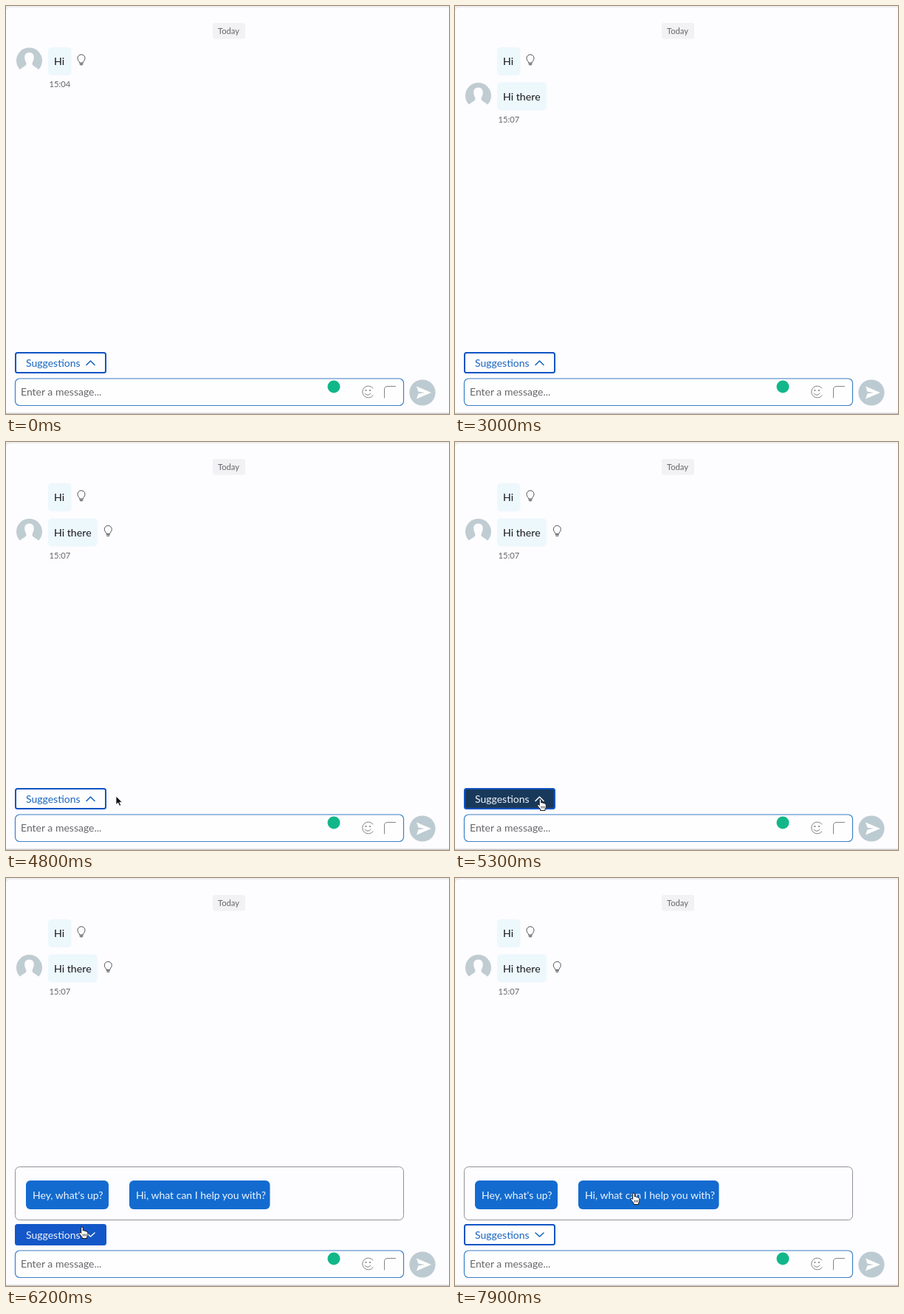
An HTML page that plays this animation: 600x553 px, repeating every 8000 ms.

```html
<!DOCTYPE html>
<html lang="en">
<head>
<meta charset="utf-8">
<title>Chat suggestions</title>
<style>
  html, body { margin: 0; width: 100%; height: 100%; overflow: hidden; background: #fdfcfe; }
  svg { display: block; width: 600px; height: 553px; font: 14px Lato, sans-serif; }
  .small { font-size: 11.2px; fill: #66666b; }
  .bubble { fill: #edf8fd; }
  .msg { font-size: 14.2px; fill: #17171b; }
  .line { fill: none; stroke-linecap: round; stroke-linejoin: round; }
  .reply rect { fill: #136bcf; }
  .reply text { fill: #eef5fc; }
</style>
</head>
<body>
<svg viewBox="0 0 600 553">
  <defs>
    <g id="bulb" class="line" stroke="#55555b" stroke-width="1">
      <path d="M-2.3 4.6C-2.5 2.8-5 2-5-1.2A5 5 0 0 1 5-1.2C5 2 2.5 2.8 2.3 4.6Z"/>
      <path d="M-2.2 6.3H2.2M-1.4 7.8H1.4"/>
    </g>
  </defs>

  <rect width="600" height="553" fill="#ededef"/>
  <path d="M0 553V8Q0 2 7 2H600V553Z" fill="#fdfcfe"/>
  <rect y="551.5" width="600" height="1.5" fill="#c9c9cd"/>

  <rect x="280" y="23" width="44" height="21.5" rx="3" fill="#f2f2f4"/>
  <text class="small" x="301.5" y="38" text-anchor="middle">Today</text>

  <rect class="bubble" x="57" y="56" width="31.5" height="38" rx="5"/>
  <text class="msg" x="65" y="80">Hi</text>
  <use href="#bulb" x="102" y="72"/>

  <g id="second">
    <rect class="bubble" x="57" y="103.5" width="67" height="38" rx="5"/>
    <text class="msg" x="65" y="128">Hi there</text>
  </g>
  <use id="newBulb" href="#bulb" x="138.3" y="119.5"/>

  <g id="sender">
    <circle cx="31.5" cy="74" r="17.5" fill="#bfccd2"/>
    <path d="M31.5 63C27 63 25 66 25.2 70C25.3 74 27 75.5 27.5 78C28 82 20 83 18.5 87V93H44.500V87C43 83 35 82 35.500 78C36 75.500 37.700 74 37.800 70C38 66 36 63 31.500 63Z" fill="#fdfcfe"/>
    <text class="small" id="clock" x="58.5" y="110">15:04</text>
  </g>

  <g id="panel">
    <rect x="12.5" y="391.500" width="526" height="72" rx="6" fill="#fdfcfe" stroke="#92929a"/>
    <g class="reply">
      <rect x="27" y="410" width="112" height="39" rx="6"/>
      <text x="36" y="435">Hey, what's up?</text>
      <rect x="167" y="410" width="190.500" height="39" rx="6"/>
      <text x="176" y="435">Hi, what can I help you with?</text>
    </g>
  </g>

  <rect id="button" x="13" y="470" width="122" height="27" rx="2.500" stroke="#1054c4" stroke-width="2"/>
  <text id="label" x="27" y="488.500">Suggestions</text>
  <path id="chevron" class="line" stroke-width="1.600"/>

  <rect x="12.500" y="505" width="526" height="36.500" rx="6" fill="#fefefe" stroke="#3c80ca" stroke-width="1.200"/>
  <text x="20" y="528" fill="#68686d">Enter a message...</text>
  <circle cx="444" cy="516" r="8.500" fill="#11b789"/>
  <g class="line" stroke="#85858a" stroke-width="1">
    <path d="M497 518A8 8 0 1 0 497 528M486 525Q490 530 494 525"/>
    <path d="M512.500 531V520Q512.500 515.500 517 515.500H527.500"/>
  </g>
  <g fill="#77777d"><circle cx="487.500" cy="521" r="1"/><circle cx="493" cy="521" r="1"/></g>
  <circle cx="564" cy="524" r="17.600" fill="#bccbd1"/>
  <path d="M556 515.500L576 524L556 532.500L558.500 525.500L567 524L558.500 522.500Z" fill="#fff"/>

  <g id="cursor" stroke-linejoin="round">
    <path id="arrow" d="M0 0V11.500L2.700 9L4.700 13.300L6.700 12.400L4.800 8.300H8.300Z" fill="#111" stroke="#fff" stroke-width=".8"/>
    <g id="hand" stroke="#16161a" stroke-width="1">
      <path d="M-1.300 8.500V1.200Q-1.300 0 0 0T1.300 1.200V5Q3 4.200 3.600 5.400Q5.300 4.900 5.800 6.100Q7.800 5.900 7.800 7.800V10.500Q7.800 12.500 6.500 13.500V15.500H0V13.700L-3.600 9.300Q-4.300 7.900-3.200 7.300T-1.300 8.500Z" fill="#fff"/>
      <path d="M1.500 9.500V12.500M3.500 9.500V12.500M5.500 9.500V12.500" fill="none" stroke-width=".8"/>
    </g>
  </g>
</svg>
<script>
const LOOP = 8000, STEP = 100;
const ARRIVE = 1200, BULB = 3900, POINTER = 4200;
const HOVER = 4900, PRESS = 5200, OPEN = 5500, LEAVE = 6600;

// time, x, y of the pointer tip
const path = [
  [4200, 470, 434], [4400, 337, 450], [4600, 229, 466], [4800, 149, 480],
  [5000, 117, 484], [5100, 115, 484], [5300, 115.5, 484], [5600, 114, 483],
  [5800, 114, 483], [6200, 103, 473], [6500, 107, 471], [6700, 124, 459],
  [6900, 141, 441], [7200, 178, 434], [7400, 222, 428], [7600, 242, 427], [8000, 242, 427]
];
const looks = {
  rest: ['#fefeff', '#1765bf', '#1054c4'],
  hover: ['#1457c8', '#f1f6fd', '#1457c8'],
  press: ['#19395a', '#f1f6fd', '#1054c4']
};

const $ = id => document.getElementById(id);
const set = (id, attrs) => {
  for (const name in attrs) $(id).setAttribute(name, attrs[name]);
};
const show = (id, on) => set(id, { opacity: +on });

function pointerAt(t) {
  const i = Math.max(1, path.findIndex(p => p[0] > t));
  const [t0, x0, y0] = path[i - 1], [t1, x1, y1] = path[i];
  const k = Math.max(0, (t - t0) / (t1 - t0));
  return [x0 + (x1 - x0) * k, y0 + (y1 - y0) * k];
}

function buttonLook(t) {
  if (t < HOVER || t >= LEAVE) return looks.rest;
  return t >= PRESS && t < OPEN ? looks.press : looks.hover;
}

function draw(t) {
  const arrived = t >= ARRIVE, open = t >= OPEN;
  show('second', arrived ? Math.min(1, 0.4 + (t - ARRIVE) / 400) : 0);
  set('sender', { transform: `translate(0 ${arrived ? 47.5 : 0})` });
  $('clock').textContent = arrived ? '15:07' : '15:04';
  show('newBulb', t >= BULB ? Math.min(1, 0.6 + (t - BULB) / 250) : 0);
  show('panel', open);

  const [fill, ink, edge] = buttonLook(t);
  set('button', { fill, stroke: edge });
  set('label', { fill: ink });
  set('chevron', {
    stroke: ink,
    d: open ? 'M109 481L114.500 486L120 481' : 'M109 486.500L114.500 481L120 486.500'
  });

  const [x, y] = pointerAt(t);
  show('cursor', t >= POINTER);
  show('arrow', t < HOVER);
  show('hand', t >= HOVER);
  set('cursor', { transform: `translate(${x} ${y})` });
}

const start = performance.now();
function tick() {
  const t = (performance.now() - start) % LOOP;
  draw(Math.floor(t / STEP) * STEP);
  requestAnimationFrame(tick);
}
tick();
</script>
</body>
</html>
```
